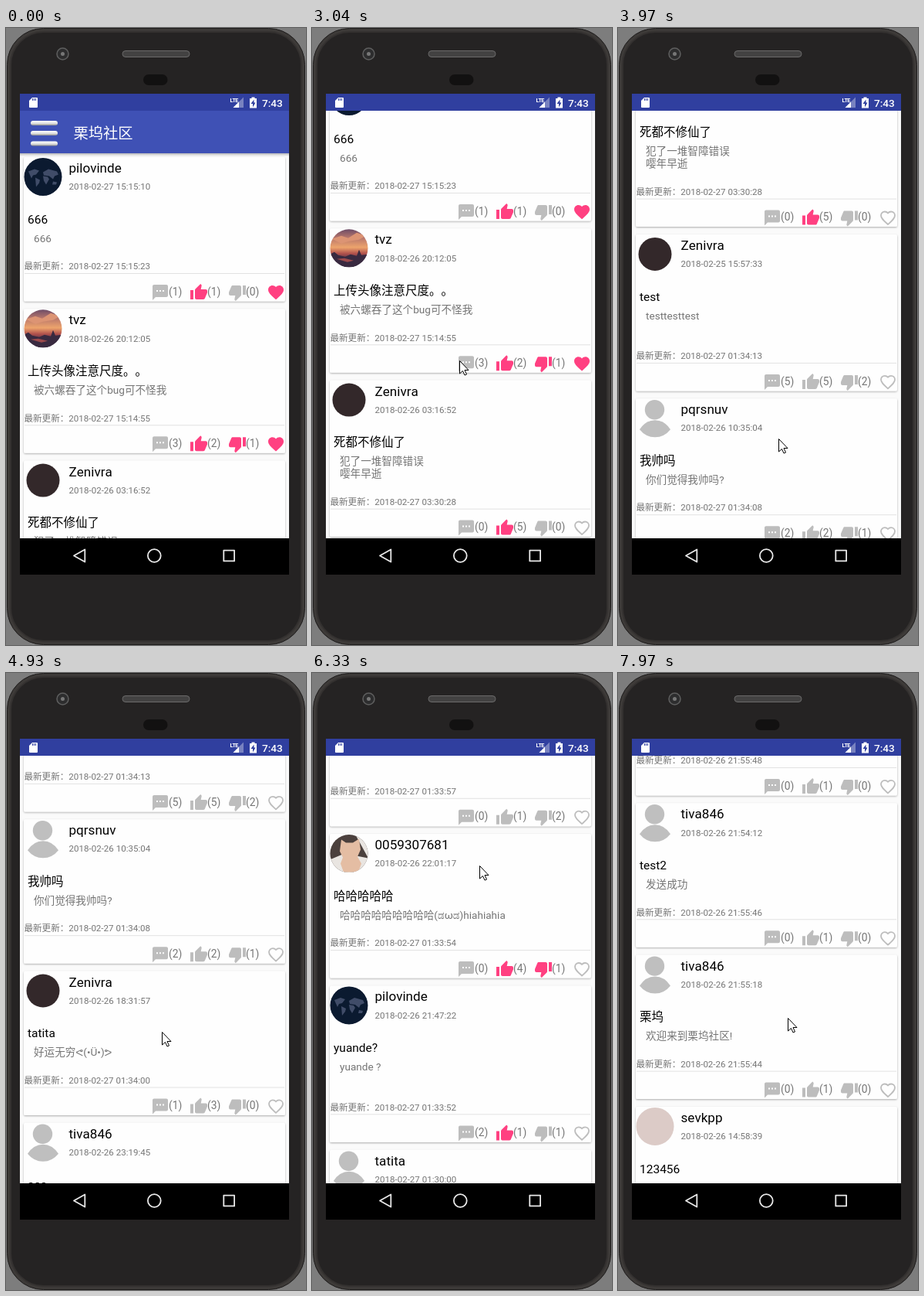
Write an HTML page that moves like this. It is 389x798 px and loops after 8000 ms.

```html
<!DOCTYPE html>
<html lang="zh-CN">
<head>
<meta charset="utf-8">
<title>社区</title>
<style>
  html, body { margin: 0; width: 100%; height: 100%; overflow: hidden; background: #7d7d7d; }
  svg { display: block; width: 389px; height: 798px; font-family: Roboto, "Noto Sans CJK SC", "DejaVu Sans", sans-serif; }
  text { white-space: pre; text-spacing-trim: space-all; font-kerning: none; }
  .name { font-size: 17.1px; }
  .meta { font-size: 11.55px; fill: #757575; }
  .title { font-size: 15.5px; }
  .body { font-size: 13.6px; fill: #757575; }
  .count { font-size: 13.8px; fill: #757575; }
  .icon { fill: #bdbdbd; }
  .icon.on { fill: #ff4081; }
  .hollow { fill: none; stroke: #bdbdbd; stroke-width: 2; }
</style>
</head>
<body>
<svg viewBox="0 0 389 798">
  <defs>
    <clipPath id="viewport"><path d="M18 107H367V660H18z"/></clipPath>
    <clipPath id="round"><circle r="24.5"/></clipPath>
    <linearGradient id="shade" x2="0" y2="1">
      <stop stop-color="#000" stop-opacity=".26"/><stop offset="1" stop-color="#000" stop-opacity="0"/>
    </linearGradient>
    <linearGradient id="chrome" x2="0" y2="1">
      <stop stop-color="#fff"/><stop offset=".6" stop-color="#dedede"/><stop offset="1" stop-color="#8d8d8d"/>
    </linearGradient>
    <linearGradient id="dusk" x2="0" y2="1">
      <stop stop-color="#6a4a66"/><stop offset=".25" stop-color="#bd7a6c"/><stop offset=".48" stop-color="#eda46c"/>
      <stop offset=".64" stop-color="#b0504c"/><stop offset=".8" stop-color="#49304a"/><stop offset="1" stop-color="#2a2236"/>
    </linearGradient>
    <filter id="lift" x="-5%" y="-5%" width="110%" height="112%">
      <feDropShadow dx="0" dy="1" stdDeviation=".9" flood-opacity=".32"/>
    </filter>

    <path id="comment" d="M20 2H4c-1.1 0-2 .9-2 2v18l4-4h14c1.1 0 2-.9 2-2V4c0-1.1-.9-2-2-2zM9 11H7V9h2zm4 0h-2V9h2zm4 0h-2V9h2z"/>
    <path id="up" d="M1 21h4V9H1zm22-11c0-1.1-.9-2-2-2h-6.3l1-4.9c0-.4-.2-.8-.5-1.1L14.2 1 7.6 7.6C7.2 8 7 8.5 7 9v10c0 1.1.9 2 2 2h9c.8 0 1.5-.5 1.8-1.2l3-7.1c.1-.2.2-.4.2-.7z"/>
    <use id="down" href="#up" transform="rotate(180 12 12)"/>
    <path id="heart" d="M12 21.3l-1.5-1.3C5.4 15.4 2 12.3 2 8.5 2 5.4 4.4 3 7.5 3c1.7 0 3.4.8 4.5 2.1C13.1 3.8 14.8 3 16.5 3 19.6 3 22 5.4 22 8.5c0 3.8-3.4 6.900-8.5 11.5z"/>

    <g id="person" fill="#bfbfbf">
      <circle cx="-.5" cy="-11" r="12.7"/>
      <path d="M-20 14.5Q-12 2.5 0 2.5T20 14.5Q12 24.5 0 24.5T-20 14.5"/>
    </g>
    <g id="map" clip-path="url(#round)">
      <circle r="25" fill="#0b1a30"/>
      <path fill="#404c68" d="M-19-7l8-3 6 2-4 5-4 1-2 4zM-10 1l6 3-1 4-4 5zM0-6l7-4 11 3 2 4-5 2-2 4-5-4-7-1zM0-1l6 1 2 3-4 7-3-5zM13 6l5 1-1 3-5 0z"/>
    </g>
    <g id="sunset" clip-path="url(#round)">
      <path fill="url(#dusk)" d="M-25-25H25V25H-25z"/>
      <path fill="#dc9474" d="M-22-12l12-4 9 3 11-7 12 4-9 5-13 2-10 3z"/>
      <path fill="#392a40" d="M-25 8l6-3 5 4 9 2 7-3 8 2 3-8 3 7 9-1V25H-25z"/>
      <path fill="#9c4a4c" d="M-16 14l10-1 12 3-8 2z"/>
    </g>
    <circle id="dark" r="21.5" fill="#33282a"/>
    <g id="cat" clip-path="url(#round)">
      <path fill="#4b403d" d="M-25-25H25V25H-25z"/>
      <path fill="#e9e5e1" d="M-25 8L-6 0 25 6V25H-25zM8-25H25V6z"/>
      <path fill="#e4bda3" d="M-10-18l6 4h9l8-5 2 14-4 9 5 9-4 11H-7l-4-11 3-8-4-8z"/>
    </g>
    <circle id="pale" r="24.5" fill="#dccbc7"/>
  </defs>

  <rect x="1.5" y=".5" width="386" height="797" rx="47" fill="#3d3a38" stroke="#1d1b1b"/>
  <rect x="6" y="5" width="377" height="788" rx="43" fill="#252323" stroke="#343130" stroke-width="2"/>
  <circle cx="73.5" cy="33.5" r="7.5" fill="#2d2d2e" stroke="#5f5f5f" stroke-width="1.5"/>
  <circle cx="73.5" cy="33.5" r="2.5" fill="#777"/>
  <rect x="151" y="29.5" width="87" height="8" rx="4" fill="#434242" stroke="#6b6a6a"/>
  <rect x="178" y="60" width="31.5" height="14" rx="7" fill="#121111"/>

  <path d="M18 659H367V707H18z"/>
  <g clip-path="url(#viewport)">
    <path fill="#fafafa" d="M18 107H368V660H18z"/>
    <g id="list"></g>
    <g id="toolbar">
      <path fill="#3f51b5" d="M18 107H368V162H18z"/>
      <path fill="url(#shade)" d="M18 162H368v4H18z"/>
      <g fill="url(#chrome)">
        <rect x="32" y="120" width="35" height="6" rx="3"/>
        <rect x="32" y="133" width="35" height="6" rx="3"/>
        <rect x="32" y="146.5" width="35" height="6" rx="3"/>
      </g>
      <text x="87.5" y="142.5" font-size="19.3" fill="#fff">栗坞社区</text>
    </g>
  </g>

  <path fill="#303f9f" d="M18 85H367V107H18z"/>
  <g fill="#fff">
    <path d="M34 90h6q1 0 1 1v11q0 1-1 1H31q-1 0-1-1V94z"/>
    <path stroke="#303f9f" d="M34.5 91v3M36.500 91v3M38.500 91v3"/>
    <path opacity=".35" d="M308 89.5V103H294.5z"/>
    <path d="M302 95.5V103H294.5z"/>
    <text x="290.5" y="95.5" font-size="7.2" font-weight="700" letter-spacing="-.8">LTE</text>
    <path d="M318.5 89.5h4v1.5h2.5v12.5h-9V91h2.500z"/>
    <path fill="#303f9f" d="M321.5 92.5v4h2l-3.5 6v-4.5h-2.500z"/>
    <text x="332" y="101.5" font-size="13.6" font-weight="500">7:43</text>
  </g>

  <g fill="none" stroke="#e8e8e8" stroke-width="1.8" stroke-linejoin="round">
    <path d="M88 682.5L102.3 674.5V690.5z"/>
    <circle cx="192.3" cy="682.5" r="8.4"/>
    <path d="M282.3 675.6h13.8v13.8h-13.800z"/>
  </g>

  <path id="cursor" fill="#fff" stroke="#000" d="M.5.5V17L4.5 13.5 7 19 9.5 18 7 12.5H12z"/>
</svg>

<script>
const LOOP = 8000, LINE = 16, PITCH = 196.3;
const byId = id => document.getElementById(id);

// avatar, name, posted, title, body lines, updated, counts, lit icons (u, d, h)
const posts = [
  ['map', 'pilovinde', '27 15:15:10', '666', ['666'], '27 15:15:23', '110', 'uh'],
  ['sunset', 'tvz', '26 20:12:05', '上传头像注意尺度。。', ['被六螺吞了这个bug可不怪我'], '27 15:14:55', '321', 'udh'],
  ['dark', 'Zenivra', '26 03:16:52', '死都不修仙了', ['犯了一堆智障错误', '嘤年早逝'], '27 03:30:28', '050', 'u'],
  ['dark', 'Zenivra', '25 15:57:33', 'test', ['testtesttest', ''], '27 01:34:13', '552', ''],
  ['person', 'pqrsnuv', '26 10:35:04', '我帅吗', ['你们觉得我帅吗?'], '27 01:34:08', '221', ''],
  ['dark', 'Zenivra', '26 18:31:57', 'tatita', ['好运无穷ᕙ(•Ü•)ᕗ'], '27 01:34:00', '130', ''],
  ['person', 'tiva846', '26 23:19:45', 'aaa', ['aaa', ''], '27 01:33:57', '012', ''],
  ['cat', '0059307681', '26 22:01:17', '哈哈哈哈哈', ['哈哈哈哈哈哈哈哈哈(ಡωಡ)hiahiahia'], '27 01:33:54', '041', 'ud'],
  ['map', 'pilovinde', '26 21:47:22', 'yuande?', ['yuande ?', ''], '27 01:33:52', '211', 'u'],
  ['person', 'tatita', '27 01:30:00', '啦啦啦啦啦啦啦~', ['啦啦啦', '啦啦啦', '我是卖报的小行家~', '۹(˘◡˘ )'], '27 01:33:48', '210', ''],
  ['person', 'tiva846', '26 21:53:46', 'test', ['来了来了'], '26 21:55:48', '010', ''],
  ['person', 'tiva846', '26 21:54:12', 'test2', ['发送成功'], '26 21:55:46', '010', ''],
  ['person', 'tiva846', '26 21:55:18', '栗坞', ['欢迎来到栗坞社区!'], '26 21:55:44', '010', ''],
  ['pale', 'sevkpp', '26 14:58:39', '123456', ['123456'], '26 21:55:40', '010', ''],
];

const text = (cls, x, y, s) => `<text class="${cls}" x="${x}" y="${y}">${s}</text>`;
const icon = (id, x, y, on) => `<use href="#${id}" class="icon ${on ? 'on' : ''}" x="${x}" y="${y}"/>`;

function card([avatar, name, posted, title, lines, updated, counts, lit], top) {
  const extra = (lines.length - 1) * LINE;
  const iconY = 163 + extra;
  const heart = lit.includes('h')
    ? icon('heart', 338, iconY, true)
    : `<use href="#heart" class="hollow" transform="translate(339.2 ${iconY + 1.2}) scale(.9)"/>`;
  return `<g transform="translate(0 ${top})">
    <rect x="23" width="339" height="${186.5 + extra}" rx="2" fill="#fefefe" filter="url(#lift)"/>
    <use href="#${avatar}" x="48" y="25.5"/>
    ${text('name', 81.5, 20, name)}
    ${text('meta', 81.5, 42.3, '2018-02-' + posted)}
    ${text('title', 28, 85.7, title)}
    ${lines.map((s, i) => text('body', 36, 109.7 + i * LINE, s)).join('')}
    ${text('meta', 23.5, 145.3 + extra, '最新更新：2018-02-' + updated)}
    <path stroke="#e2e2e2" d="M24 ${150.5 + extra}H361"/>
    ${icon('comment', 188, iconY)}
    ${icon('up', 238, iconY, lit.includes('u'))}
    ${icon('down', 288, iconY, lit.includes('d'))}
    ${heart}
    ${[...counts].map((n, i) => text('count', 211 + i * 50, 178.7 + extra, `(${n})`)).join('')}
  </g>`;
}

let nextTop = 167;
byId('list').innerHTML = posts.map(post => {
  const html = card(post, nextTop);
  nextTop += PITCH + (post[4].length - 1) * LINE;
  return html;
}).join('');

// time, pointer x, pointer y, scroll: drags alternate with flings
const path = [
  [210, 288, 678, 0], [1240, 173, 166, 0], [1410, 173, 166, 0], [2430, 190, 556, 0],
  [2580, 190, 540, 4], [3040, 191, 430, 104], [3400, 196, 230, 304], [3970, 208, 531, 505],
  [4400, 205, 330, 700], [4930, 202, 464, 795], [5350, 207, 240, 1012], [5800, 212, 530, 1100],
  [6330, 217, 249, 1381], [6800, 223, 520, 1640], [7260, 228, 272, 1889], [7650, 224, 540, 2176],
  [7970, 220, 446, 2270],
];

// The screen refreshes in bursts with a pause after each one.
const bursts = [210, 1410, 2580, 3740, 4930, 6100, 7260];
const beats = [0, 75, 150, 230, 310, 385, 460, 540, 770, 1010];
const ticks = [0, ...bursts.flatMap(b => beats.map(o => b + o)), 7970]
  .filter(t => t <= 3970 || t >= 4200)
  .sort((a, b) => a - b);

function sample(t) {
  const next = path.findIndex(k => k[0] > t);
  if (next < 0) return path[path.length - 1];
  if (next === 0) return path[0];
  const a = path[next - 1], b = path[next];
  const p = (t - a[0]) / (b[0] - a[0]);
  return a.map((v, i) => v + (b[i] - v) * p);
}

function draw(now) {
  const t = now % LOOP;
  const tick = ticks.filter(k => k <= t).pop();
  const [, x, y, scroll] = sample(tick);
  byId('list').setAttribute('transform', `translate(0 ${-scroll})`);
  byId('toolbar').setAttribute('transform', `translate(0 ${-Math.min(scroll, 60)})`);
  byId('cursor').setAttribute('transform', `translate(${Math.round(x)} ${Math.round(y)})`);
  byId('cursor').setAttribute('visibility', tick < 210 ? 'hidden' : 'visible');
}

const start = performance.now();
function loop() {
  draw(performance.now() - start);
  requestAnimationFrame(loop);
}
loop();
</script>
</body>
</html>
```
